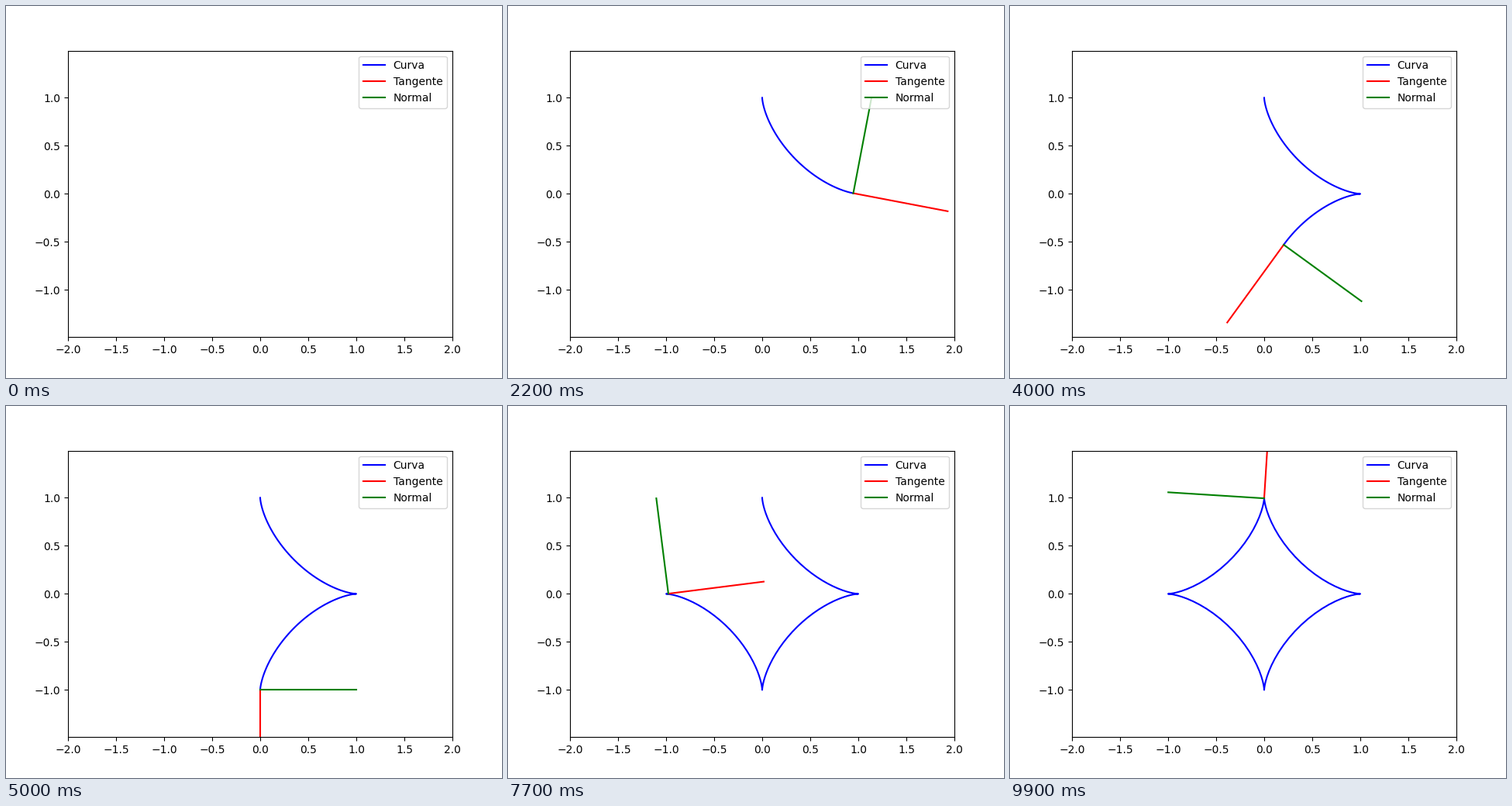
Animation, 640 px wide and 480 px high, one loop 10 s. Source, as a matplotlib script:

```python
import numpy as np
import matplotlib.pyplot as plt
from matplotlib.animation import FuncAnimation

FRAMES = 100
SAMPLES = 100


def curve(t):
    return np.sin(t) ** 3, np.cos(t) ** 3


def unit_tangent(t):
    s, c = np.sin(t), np.cos(t)
    dx, dy = 3 * s**2 * c, -3 * c**2 * s
    norm = np.hypot(dx, dy)
    # The direction is undefined where the curve starts
    return (dx / norm, dy / norm) if norm > 0 else (np.nan, np.nan)


fig, ax = plt.subplots(figsize=(6.4, 4.8), dpi=100)
half_height = 2 * (4.8 * 0.77) / (6.4 * 0.775)  # equal units on both axes
ax.set_xlim(-2, 2)
ax.set_ylim(-half_height, half_height)
ax.set_yticks(np.arange(-1, 1.1, 0.5))

path, = ax.plot([], [], color="blue", label="Curva")
tangent, = ax.plot([], [], color="red", label="Tangente")
normal, = ax.plot([], [], color="green", label="Normal")
ax.legend(loc="upper right")


def set_ray(line, x, y, dx, dy):
    line.set_data([x, x + dx], [y, y + dy])


def update(i):
    t = 2 * np.pi * i / FRAMES
    path.set_data(*curve(np.linspace(0, t, SAMPLES)))
    x, y = curve(t)
    tx, ty = unit_tangent(t)
    set_ray(tangent, x, y, tx, ty)
    set_ray(normal, x, y, -ty, tx)
    return path, tangent, normal


def init():
    return update(0)


anim = FuncAnimation(fig, update, frames=FRAMES, init_func=init,
                     interval=100, repeat=True, repeat_delay=0)
plt.show()
```
